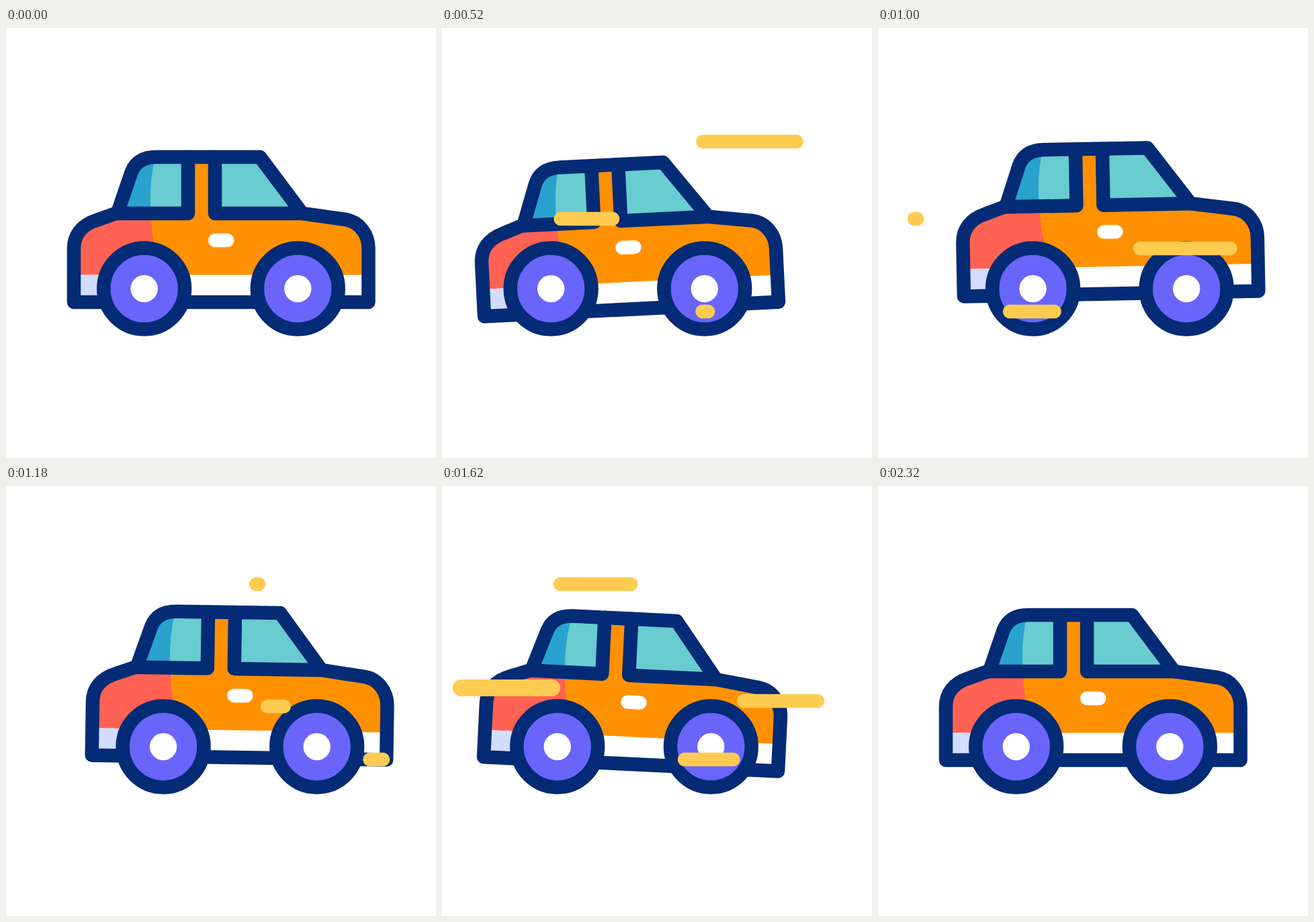
An HTML page for the animation above (2.42 s loop, 640 px wide and 640 px high).

```html
<!DOCTYPE html>
<html lang="en">
<head>
<meta charset="utf-8">
<title>Driving car</title>
<style>
  html, body { margin: 0; width: 100%; height: 100%; overflow: hidden; background: #fff; }
  svg { display: block; width: 100vw; height: 100vh; }
  .line { fill: none; stroke: #042b75; stroke-width: 20.5; stroke-linejoin: round; stroke-linecap: round; }
  #streaks { stroke: #ffcb51; stroke-linecap: round; }
</style>
</head>
<body>
<svg viewBox="0 0 640 640">
  <defs>
    <path id="shell" d="M101 408V328C101 308 113 293 135 286L166 275L186.500 215Q195 192 224 192H378L441 276L505 285C525 288 539.500 306 539.500 328V408Z"/>
    <clipPath id="inside"><use href="#shell"/></clipPath>
    <g id="wheel">
      <circle class="line" r="60.400" style="fill:#6965fa"/>
      <circle r="20.200" fill="#fff"/>
    </g>
  </defs>
  <g id="car">
    <g id="body">
      <g clip-path="url(#inside)">
        <path fill="#ff9100" d="M80 180H560V368H80Z"/>
        <path fill="#ff6252" d="M80 276H216Q216 300 221 325L230 368H80Z"/>
        <path fill="#fff" d="M80 367.500H560V420H80Z"/>
        <path fill="#d2dcfd" d="M80 367.500H205V420H80Z"/>
        <path fill="#68ccd1" d="M150 180H271V276H150ZM311 180H450V276H311Z"/>
        <path fill="#29a2cd" d="M150 180H224L222 192Q212 235 216 276H150Z"/>
      </g>
      <use href="#shell" class="line"/>
      <path class="line" d="M166 276H271V192M311 192V276H441"/>
      <rect x="301" y="305.700" width="38.500" height="20.500" rx="10.250" fill="#fff"/>
    </g>
    <use href="#wheel" x="205.700" y="388"/>
    <use href="#wheel" x="434.300" y="388"/>
  </g>
  <g id="streaks"></g>
</svg>
<script>
const LOOP = 2420;
const STREAK = { length: 200, duration: 450, tailDelay: 260, width: 20.5 };

// Turning points of each swing, as [time, value]; every swing starts at 0
const drive = [[583, -45], [1102, 32.5], [1625, -34], [2190, 0]];
const tilt = [[665, -3.2], [1515, 3], [2170, 0]];
const bounce = [[474, 11.3], [957, -13], [1505, 12], [1840, -9.5], [2180, 0]];

const get = id => document.getElementById(id);
const car = get("car"), body = get("body");

function ease(u) {
  u = Math.min(1, Math.max(0, u));
  return u * u * (3 - 2 * u);
}

function swing(points, t) {
  let time = 0, value = 0, sum = 0;
  for (const [nextTime, nextValue] of points) {
    sum += (nextValue - value) * ease((t - time) / (nextTime - time));
    [time, value] = [nextTime, nextValue];
  }
  return sum;
}

// A line that grows to the left and is then eaten up from the right
function streak(y, x, start, width = STREAK.width) {
  const line = document.createElementNS("http://www.w3.org/2000/svg", "line");
  const set = (name, value) => line.setAttribute(name, value);
  get("streaks").append(line);
  set("y1", y);
  set("y2", y);
  set("stroke-width", width);
  return t => {
    const head = ease((t - start) / STREAK.duration);
    const tail = ease((t - start - STREAK.tailDelay) / STREAK.duration);
    set("x1", x - STREAK.length * head);
    set("x2", x - STREAK.length * tail);
    set("visibility", head > 0 && tail < 1 ? "visible" : "hidden");
  };
}

const streaks = [
  streak(169, 530, 232),
  streak(284, 254, 330),
  streak(422, 396, 465),
  streak(328, 589, 570),
  streak(407, 561, 1094),
  streak(146, 376, 1144),
  streak(300.5, 227, 1192, 25),
  streak(320, 559, 1381)
];

function draw() {
  const t = performance.now() % LOOP;
  car.setAttribute("transform", `translate(${swing(drive, t)} 0)`);
  body.setAttribute("transform", `translate(0 ${swing(bounce, t)}) rotate(${swing(tilt, t)} 320 300)`);
  streaks.forEach(update => update(t));
  requestAnimationFrame(draw);
}
draw();
</script>
</body>
</html>
```
